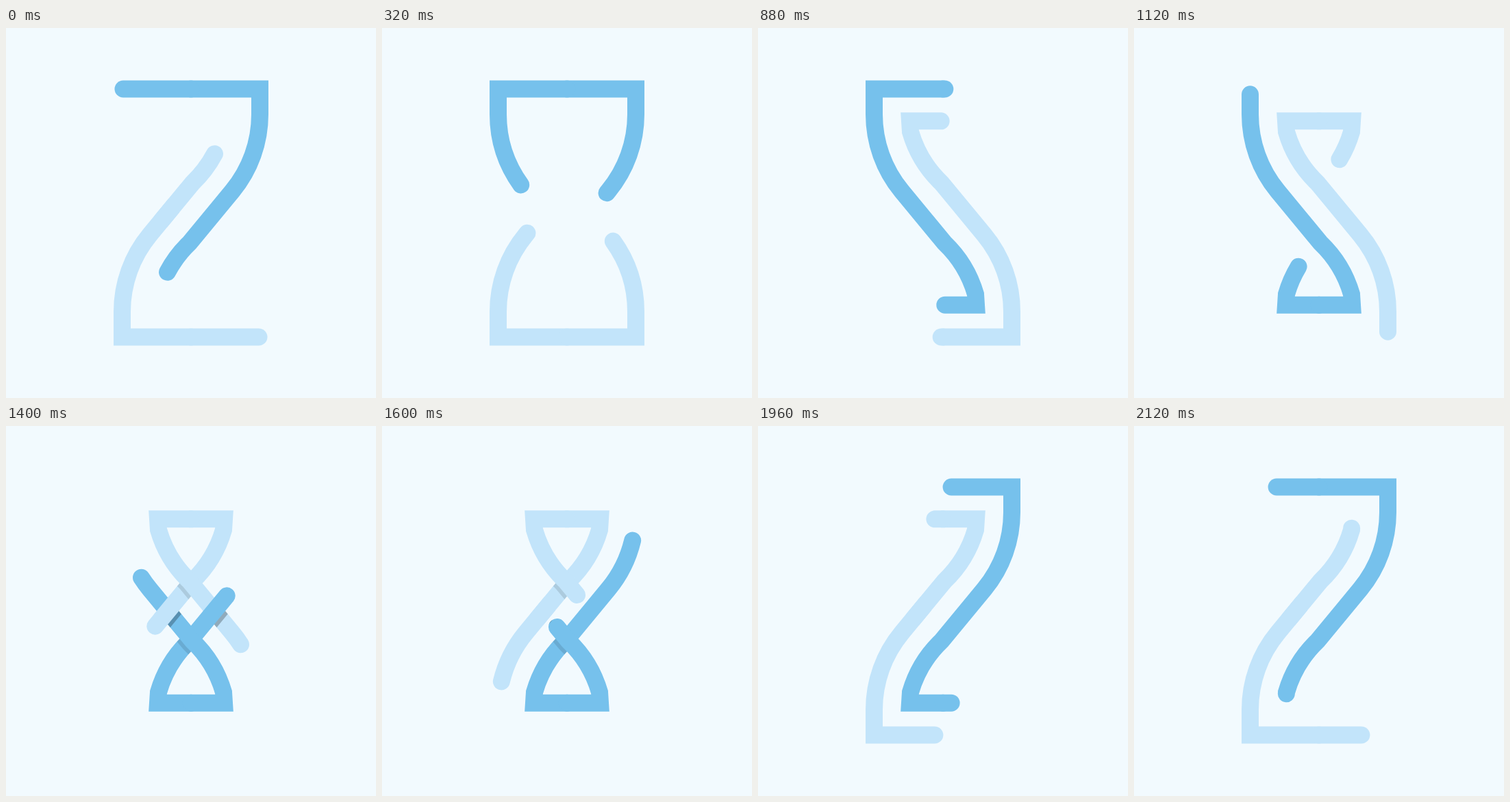
An HTML page for the animation above (2.16 s loop, 540 by 540 pixels).

```html
<!DOCTYPE html>
<html lang="en">
<head>
<meta charset="utf-8">
<title>Woven hourglass loop</title>
<style>
  html, body { margin: 0; width: 100%; height: 100%; overflow: hidden; background: #f2fafe; }
  svg { display: block; width: 100vw; height: 100vh; }
  .dark { stroke: #76c1ec; }
  .light { stroke: #c2e4fa; }
  .mask { stroke: #fff; }
  .soft { stroke: #000; opacity: .11; }
  .deep { stroke: #000; opacity: .25; }
</style>
</head>
<body>
<svg viewBox="0 0 540 540" fill="none" stroke-width="25" stroke-linecap="round" stroke-linejoin="miter">
  <defs>
    <!-- Each ribbon runs on a figure eight made of a left and a right strand -->
    <path id="darkL" d="M270 89H169.5V126A176 176 0 0 0 209.7 238L272 313.5A168 168 0 0 1 317.5 388.5L318.5 404.2H270"/>
    <path id="darkR" d="M270 404.2H221.5L222.5 388.5A168 168 0 0 1 268 313.5L330.3 238A176 176 0 0 0 370.5 126V89H270"/>
    <g id="lightL"><use href="#darkL" transform="rotate(180 270 270)"/></g>
    <g id="lightR"><use href="#darkR" transform="rotate(180 270 270)"/></g>

    <mask id="onDarkL" maskUnits="userSpaceOnUse" x="0" y="0" width="540" height="540"><use href="#darkL" class="mask"/></mask>
    <mask id="onDarkR" maskUnits="userSpaceOnUse" x="0" y="0" width="540" height="540"><use href="#darkR" class="mask"/></mask>
    <mask id="onLightL" maskUnits="userSpaceOnUse" x="0" y="0" width="540" height="540"><use href="#lightL" class="mask"/></mask>
    <mask id="onLightR" maskUnits="userSpaceOnUse" x="0" y="0" width="540" height="540"><use href="#lightR" class="mask"/></mask>

    <clipPath id="top"><rect x="240" y="198" width="60" height="60"/></clipPath>
    <clipPath id="bottom"><rect x="240" y="282" width="60" height="60"/></clipPath>
    <clipPath id="left"><rect x="205" y="240" width="60" height="60"/></clipPath>
    <clipPath id="right"><rect x="275" y="240" width="60" height="60"/></clipPath>
    <clipPath id="weave"><rect x="216" y="249" width="37" height="42"/></clipPath>
  </defs>

  <use href="#lightR" class="light"/>
  <g clip-path="url(#top)" mask="url(#onLightR)"><use href="#lightL" class="soft" transform="translate(-4.3 3.5)"/></g>
  <use href="#lightL" class="light"/>
  <g clip-path="url(#right)" mask="url(#onLightL)"><use href="#darkR" class="deep" transform="translate(4.3 3.5)"/></g>
  <use href="#darkR" class="dark"/>
  <g clip-path="url(#bottom)" mask="url(#onDarkR)"><use href="#darkL" class="soft" transform="translate(-4.3 3.5)"/></g>
  <use href="#darkL" class="dark"/>
  <g clip-path="url(#left)" mask="url(#onDarkL)"><use href="#lightR" class="deep" transform="translate(4.3 3.5)"/></g>
  <g clip-path="url(#weave)"><use href="#lightR" class="light"/></g>
</svg>
<script>
const LOOP = 2160, STEP = 40, LAP = 2200, HEAD_START = 99;
const strands = ['darkL', 'darkR'].map(id => document.getElementById(id));
const half = strands[0].getTotalLength();
const lap = 2 * half;

// The ribbon covers half a lap, so each strand shows one stretch of it.
function showStrand(path, head) {
  const from = Math.max(0, head - half);
  const length = Math.min(head, half) - from;
  path.setAttribute('stroke-dasharray', `${length} 9999`);
  path.setAttribute('stroke-dashoffset', -from);
}

function render(ms) {
  const time = Math.floor(ms / STEP) * STEP % LOOP;
  const head = HEAD_START + lap * time / LAP;
  strands.forEach((path, i) => showStrand(path, (head - i * half + lap) % lap));
}

const start = performance.now();
const SLACK = 6; // absorbs small timer lag at step edges
function tick(now) {
  render(Math.max(0, now - start) + SLACK);
  requestAnimationFrame(tick);
}
render(0);
requestAnimationFrame(tick);
</script>
</body>
</html>
```
